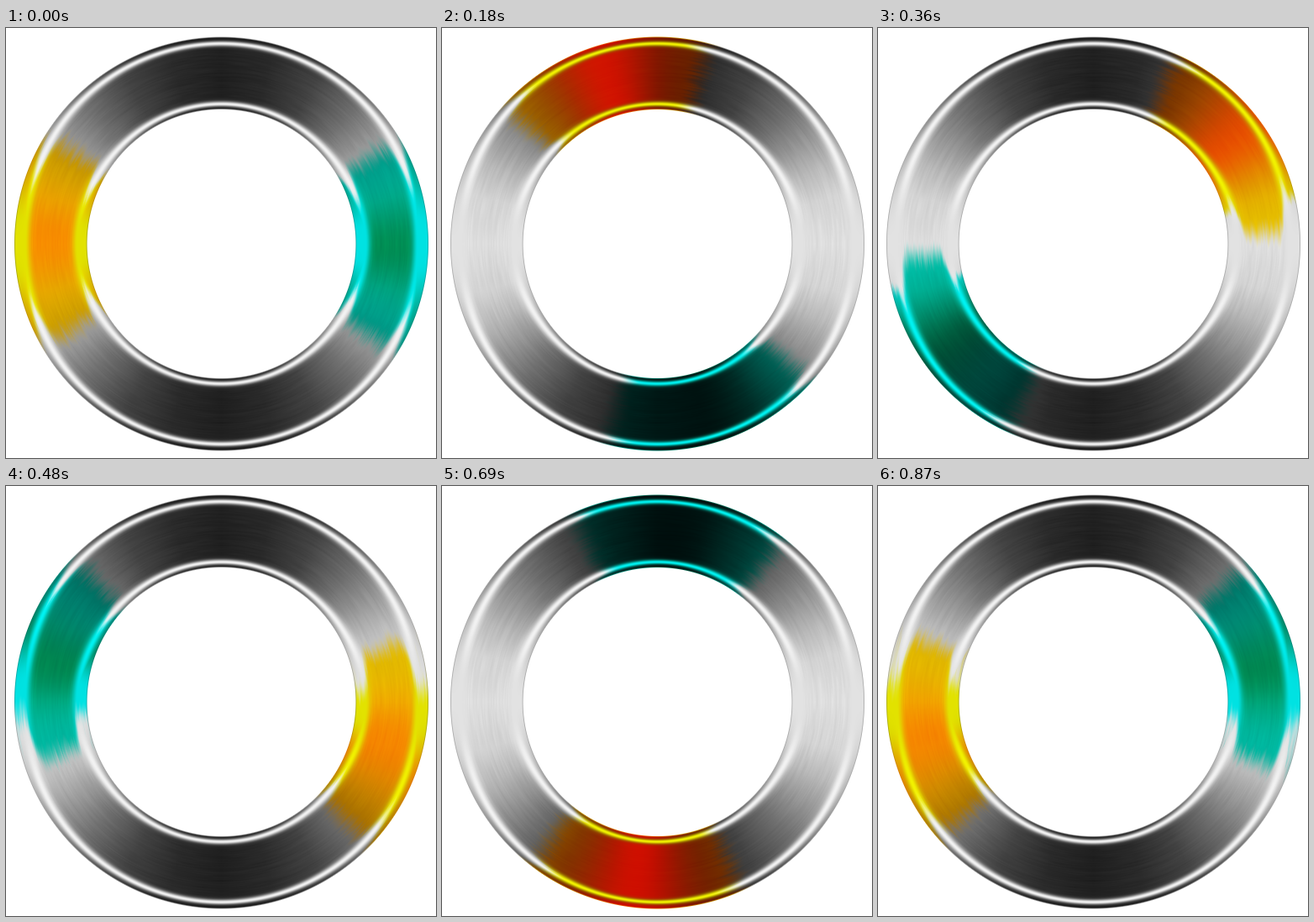
Animation, 512 px wide and 512 px high, one loop 900 ms. Source, as an HTML page with a canvas:

```html
<!DOCTYPE html>
<html lang="en">
<head>
<meta charset="utf-8">
<title>Metal ring</title>
<style>
html, body { margin: 0; width: 100%; height: 100%; overflow: hidden; background: #fff; }
canvas { display: block; width: 100%; height: 100%; }
</style>
</head>
<body>
<canvas id="ring" width="512" height="512"></canvas>
<script>
const SIZE = 512, CX = 256.5, CY = 257, OUTER = 246.5, INNER = 160;
const LOOP = 900, STEPS = 30;

// Brushed metal tone against degrees away from the horizontal axis
const TONES = [[0, 222], [15, 211], [25, 185], [35, 149], [45, 112], [60, 66], [75, 41], [90, 31]];

const ctx = document.getElementById('ring').getContext('2d');
const image = ctx.createImageData(SIZE, SIZE);
const data = image.data;

const clamp = (v, lo = 0, hi = 1) => Math.min(hi, Math.max(lo, v));
const mix = (a, b, t) => a + (b - a) * t;
const smooth = (a, b, v) => {
  const t = clamp((v - a) / (b - a));
  return t * t * (3 - 2 * t);
};
const gauss = x => Math.exp(-x * x);

function toneAt(phi) {
  let i = 1;
  while (i < TONES.length - 1 && phi > TONES[i][0]) i++;
  const [a, va] = TONES[i - 1], [b, vb] = TONES[i];
  return mix(va, vb, (phi - a) / (b - a));
}

function hash(x, y) {
  const s = Math.sin(x * 127.1 + y * 311.7) * 43758.5453;
  return (s - Math.floor(s)) * 2 - 1;
}

// Streaks: fine across the radius, long around the ring
function streak(r, deg, cells) {
  const u = deg / 360 * cells, i = Math.floor(u), j = Math.floor(r);
  const f = smooth(0, 1, u - i);
  const row = y => mix(hash(i % cells, y), hash((i + 1) % cells, y), f);
  return mix(row(j), row(j + 1), r - j);
}

function metal(r, deg) {
  const fold = deg % 180;
  const phi = Math.min(fold, 180 - fold);
  const cos2 = Math.cos(phi * Math.PI / 180) ** 2;
  const side = 1 - smooth(6, 26, phi);
  const outer = OUTER - r < r - INNER;
  const t = outer ? OUTER - r : r - INNER;
  const peak = (outer ? 8 : 6.5) + (outer ? 4.5 : 5) * cos2 ** 4;
  const white = mix(242, 226, side);
  const noise = 0.6 * streak(r * 0.8, deg, 60) + 0.4 * streak(r / 3, deg, 12);
  let shine, tone;
  if (t > peak) {
    shine = gauss((t - peak) / (3.2 + 3 * cos2));
    const body = toneAt(phi);
    tone = mix(body + noise * (4 + body * 0.02), white, shine);
  } else {
    const g = gauss((t - peak) / (2.9 + 3 * cos2));
    shine = Math.max(g, side);
    tone = mix(mix(25, 226, cos2 ** 1.4), white, g);
    tone = mix(tone, 165, 1 - smooth(0, 1.6, t));
  }
  const reach = 34 + 2.5 * noise - shine * (3 + 11 * cos2);
  return { tone, shine, reach };
}

const pixels = [];
for (let y = 0; y < SIZE; y++) {
  for (let x = 0; x < SIZE; x++) {
    const dx = x + 0.5 - CX, dy = y + 0.5 - CY, r = Math.hypot(dx, dy);
    const cover = clamp(OUTER - r + 0.5) * clamp(r - INNER + 0.5);
    if (!cover) continue;
    const deg = (Math.atan2(dy, dx) * 180 / Math.PI + 360) % 360;
    const m = metal(clamp(r, INNER, OUTER), deg);
    m.at = (y * SIZE + x) * 4;
    m.deg = deg;
    data[m.at + 3] = cover * 255;
    pixels.push(m);
  }
}

function paint(angle) {
  for (const { at, deg, tone, shine, reach } of pixels) {
    const away = Math.abs((deg - angle + 540) % 360 - 180);
    const warm = away < 90;
    const d = warm ? away : 180 - away;
    let red = tone, green = tone, blue = tone;
    if (d < reach + 2) {
      const tint = 1 - smooth(reach - 8, reach + 2, d);
      const body = tint * (1 - shine);
      const core = gauss(d / 16);
      const room = 1 - tone / 255;
      green = tone * (1 - body * (0.12 + core * (0.2 + 0.3 * room)));
      if (warm) {
        red = tone + body * (70 + 128 * core) * room;
        blue = tone * (1 - tint);
      } else {
        red = tone * (1 - tint);
        blue = tone * (1 - body * (0.22 + 0.4 * core));
      }
    }
    data[at] = red;
    data[at + 1] = green;
    data[at + 2] = blue;
  }
  ctx.putImageData(image, 0, 0);
}

let shown = -1;
const start = performance.now();
function tick() {
  const time = (performance.now() - start) % LOOP;
  const step = Math.floor(time / LOOP * STEPS);
  if (step !== shown) {
    paint((181 + step * 360 / STEPS) % 360);
    shown = step;
  }
  requestAnimationFrame(tick);
}
tick();
</script>
</body>
</html>
```
